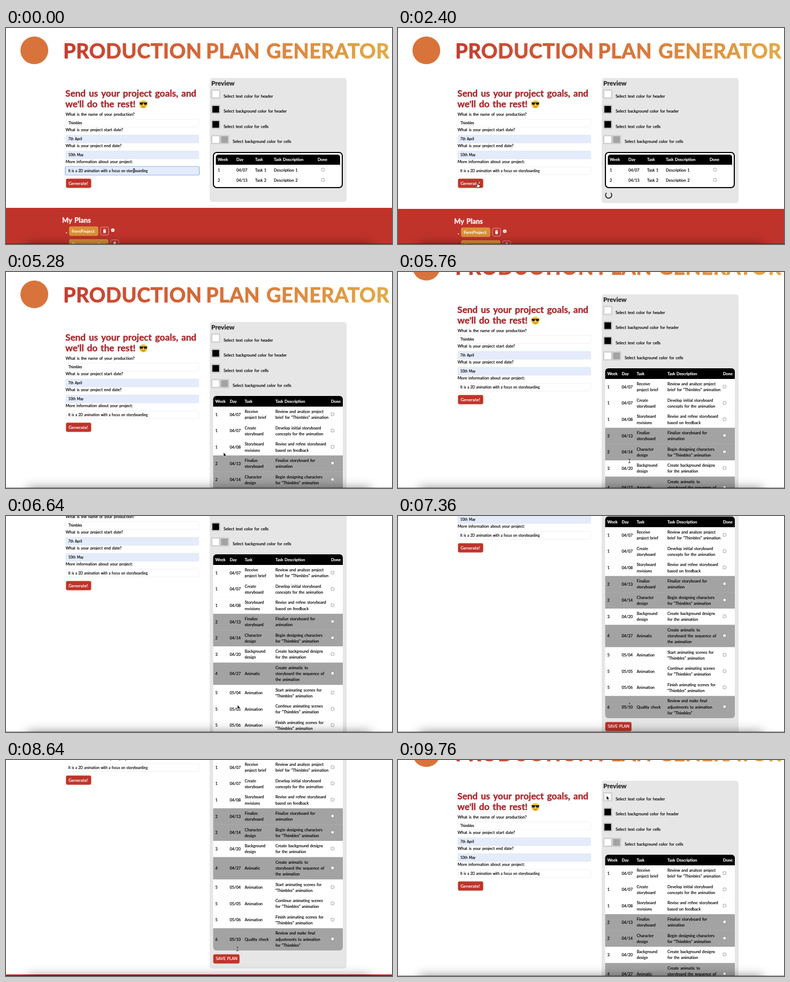
An HTML page with a canvas that plays this animation: 722 px wide and 406 px high, repeating every 9840 ms.

```html
<!DOCTYPE html>
<html lang="en">
<head>
<meta charset="utf-8">
<title>Production Plan Generator</title>
<style>
  html, body { margin: 0; width: 722px; height: 406px; overflow: hidden; background: #fff; }
  canvas { display: block; }
</style>
</head>
<body>
<canvas id="stage" width="722" height="406"></canvas>
<script>
const ctx = document.getElementById('stage').getContext('2d');
const W = 722, H = 406, LOOP = 9840;
const RED = '#c0332b', ORANGE = '#d99037', BLUE = '#e4ecfb', GREY = '#a3a3a3', HEADING = '#ab292c';
const CLICK = 1500, SPIN = 1600, RESULT = 4800;
const PROJECT = 'Thimbles';

// [week, date, task lines, description lines]
const PLAN = [
  ['1', '04/07', 'Receive|project brief', `Review and analyze project|brief for "${PROJECT}" animation`],
  ['1', '04/07', 'Create|storyboard', 'Develop initial storyboard|concepts for the animation'],
  ['1', '04/08', 'Storyboard|revisions', 'Revise and refine storyboard|based on feedback'],
  ['2', '04/13', 'Finalize|storyboard', 'Finalize storyboard for|animation'],
  ['2', '04/14', 'Character|design', `Begin designing characters|for "${PROJECT}" animation`],
  ['3', '04/20', 'Background|design', 'Create background designs|for the animation'],
  ['4', '04/27', 'Animatic', 'Create animatic to|storyboard the sequence of|the animation'],
  ['5', '05/04', 'Animation', `Start animating scenes for|"${PROJECT}" animation`],
  ['5', '05/05', 'Animation', `Continue animating scenes|for "${PROJECT}" animation`],
  ['5', '05/06', 'Animation', `Finish animating scenes for|"${PROJECT}" animation`],
  ['6', '05/10', 'Quality check', `Review and make final|adjustments to animation|for "${PROJECT}"`]
];

// Keyframes: [time, ...values]
const SCROLL = [[5380, 0], [5760, 52], [6200, 118], [6640, 161], [7280, 232],
  [8100, 232], [8360, 300], [8480, 300], [8900, 180], [9320, 55]];
const POINTER = [[300, 239, 268], [1200, 149, 291], [2600, 149, 291], [3300, 263, 251],
  [4900, 263, 251], [5350, 433, 355], [8700, 433, 355], [9500, 390, 67]];

function track(keys, t) {
  if (t <= keys[0][0]) return keys[0].slice(1);
  for (let i = 1; i < keys.length; i++) {
    const a = keys[i - 1], b = keys[i];
    if (t < b[0]) {
      const u = (t - a[0]) / (b[0] - a[0]);
      return a.slice(1).map((v, k) => v + (b[k + 1] - v) * u);
    }
  }
  return keys[keys.length - 1].slice(1);
}

// Text placed by its left edge and the vertical middle of its letters;
// a hairline outline gives the slightly heavy look.
function text(str, x, y, size = 7.5, weight = 400, color = '#000') {
  const base = y + size * 0.34;
  ctx.font = `${weight} ${size}px Lato, sans-serif`;
  ctx.wordSpacing = `${size * 0.1}px`;
  ctx.fillStyle = ctx.strokeStyle = color;
  ctx.lineWidth = size * 0.025;
  ctx.fillText(str, x, base);
  ctx.strokeText(str, x, base);
}

function lines(str, x, y) {
  const parts = str.split('|');
  parts.forEach((s, i) => text(s, x, y + (i - (parts.length - 1) / 2) * 11.2, 7.4));
}

function box(x, y, w, h, r, fill, stroke, lw = 1) {
  ctx.beginPath();
  ctx.roundRect(x, y, w, h, r);
  if (fill) { ctx.fillStyle = fill; ctx.fill(); }
  if (stroke) { ctx.strokeStyle = stroke; ctx.lineWidth = lw; ctx.stroke(); }
}

function disc(x, y, r, fill) {
  ctx.beginPath();
  ctx.arc(x, y, r, 0, Math.PI * 2);
  ctx.fillStyle = fill;
  ctx.fill();
}

function path(points, fill, stroke, lw = 1, close = true) {
  ctx.beginPath();
  points.forEach(([x, y]) => ctx.lineTo(x, y));
  if (close) ctx.closePath();
  if (fill) { ctx.fillStyle = fill; ctx.fill(); }
  if (stroke) { ctx.strokeStyle = stroke; ctx.lineWidth = lw; ctx.stroke(); }
}

const checkbox = (x, y) => box(x - 2.7, y - 2.7, 5.4, 5.4, 1, '#fff', '#777', 0.7);

function button(label, x, y, w, size, fill = RED) {
  box(x + 0.4, y + 0.4, w - 0.8, 16.8, 2.5, fill, fill === RED ? '#cb5f36' : '#e0a048', 0.8);
  text(label, x + 5, y + 8.7, size, 400, '#fff');
}

function header() {
  disc(53, 42, 26, '#d8743b');
  const g = ctx.createLinearGradient(109, 0, 719, 0);
  g.addColorStop(0, '#c43c30');
  g.addColorStop(0.5, '#d7733a');
  g.addColorStop(1, '#e3ab48');
  ctx.letterSpacing = '0.5px';
  [['PRODUCTION', 107], ['PLAN', 374], ['GENERATOR', 487]].forEach(([s, x]) => text(s, x, 43.8, 38, 700, g));
  ctx.letterSpacing = '0px';
}

function emoji(x, y) {
  disc(x, y, 7.6, '#fbc638');
  ctx.fillStyle = '#222';
  ctx.fillRect(x - 7.4, y - 3.4, 14.8, 1.2);
  box(x - 6.8, y - 3.3, 6, 4.4, [0, 0, 2.5, 2.5], '#222');
  box(x + 0.8, y - 3.3, 6, 4.4, [0, 0, 2.5, 2.5], '#222');
  ctx.beginPath();
  ctx.arc(x, y + 1.6, 3.4, 0.3, Math.PI - 0.3);
  ctx.strokeStyle = '#7a4a15';
  ctx.lineWidth = 1;
  ctx.stroke();
}

function form(focused) {
  text('Send us your project goals, and', 111, 123.5, 17.2, 700, HEADING);
  text("we'll do the rest!", 111, 143.5, 17.2, 700, HEADING);
  emoji(257, 143.3);
  [
    ['What is the name of your production?', PROJECT, '#fff'],
    ['What is your project start date?', '7th April', BLUE],
    ['What is your project end date?', '10th May', BLUE],
    ['More information about your project:', 'It is a 2D animation with a focus on storyboarding', focused ? BLUE : '#fff']
  ].forEach(([label, value, fill], i) => {
    const y = 162 + i * 29.9;
    text(label, 111.5, y);
    if (focused && i === 3) box(111.5, y + 9.3, 249.5, 14.8, 2, null, '#a3c1f5', 3);
    box(112, y + 9.3, 248.5, 14.8, 1.5, fill, fill === BLUE ? '#dce5f6' : '#ececec', 0.8);
    text(value, 116.5, y + 17, 6.55);
  });
  button('Generate!', 112, 283, 47.5, 8.4);
}

function swatch(x, y, color) {
  box(x - 7.8, y - 7.8, 15.6, 15.6, 0.5, '#efefef', '#a9a9a9', 0.7);
  box(x - 6.4, y - 6.4, 12.8, 12.8, 0, color, '#999', 0.3);
}

function headRow(y, columns) {
  ['Week', 'Day', 'Task', 'Task Description', 'Done']
    .forEach((s, i) => text(s, columns[i], y, 7.4, 700, '#fff'));
}

function sampleTable() {
  box(388, 234, 241, 66, 6, '#fff', '#000', 2);
  box(392.5, 238, 232.5, 19, [5, 5, 0, 0], '#000');
  headRow(247.5, [396, 431, 466, 501, 583]);
  [['1', '04/07'], ['2', '04/13']].forEach(([n, date], i) => {
    const y = 267 + i * 19;
    text(n, 396, y, 7.4);
    text(date, 431, y, 7.4);
    text(`Task ${i + 1}`, 466, y, 7.4);
    text(`Description ${i + 1}`, 501, y, 7.4);
    checkbox(593, y - 0.8);
  });
}

function planTable() {
  box(387.5, 233, 242.5, 20.2, [6, 6, 0, 0], '#000');
  headRow(243, [391.5, 418.5, 446.5, 504, 608]);
  let y = 253;
  PLAN.forEach(([week, date, task, about], i) => {
    const h = about.split('|').length === 3 ? 41.8 : 30.6;
    const mid = y + h / 2;
    const r = i === PLAN.length - 1 ? [0, 0, 6, 6] : 0;
    box(387.5, y, 242.5, h + (r ? 0 : 0.3), r, week % 2 ? '#fff' : GREY);
    text(week, 391.5, mid, 7.4);
    text(date, 418.5, mid, 7.4);
    lines(task, 446.5, mid);
    lines(about, 504, mid);
    checkbox(610.7, mid - 0.8);
    y += h;
  });
  button('SAVE PLAN', 387.5, 619, 49.5, 7.6);
}

function spinner(t) {
  const gap = -Math.PI / 2 + (t - 2400) / 750 * Math.PI * 2;
  ctx.beginPath();
  ctx.arc(394, 314, 5.8, gap + Math.PI / 4, gap + Math.PI * 7 / 4);
  ctx.strokeStyle = '#222';
  ctx.lineWidth = 1.8;
  ctx.stroke();
}

function preview(t, bottom) {
  box(381, 94, 256, bottom - 94, 5, '#e6e6e6');
  text('Preview', 384, 104, 12.1, 700, '#222');
  swatch(392.3, 124.3, '#fff');
  swatch(392.3, 152.8, '#000');
  swatch(392.3, 181.2, '#000');
  swatch(392.3, 209.7, '#fff');
  swatch(408.8, 209.7, GREY);
  ['text color for header', 'background color for header', 'text color for cells', 'background color for cells']
    .forEach((s, i) => text('Select ' + s, i === 3 ? 424 : 407, 128 + i * 28.5));
  if (t >= RESULT) planTable(); else sampleTable();
  if (t >= SPIN && t < RESULT) spinner(t);
}

function trash(x, y) {
  box(x, y, 15, 15, 2.5, null, '#e8b9b5', 0.8);
  ctx.fillStyle = '#fff';
  ctx.fillRect(x + 4.8, y + 4.2, 5.4, 1);
  ctx.fillRect(x + 6.3, y + 3.4, 2.4, 1);
  box(x + 5.2, y + 5.7, 4.6, 5.5, 0.8, '#fff');
}

function footer(top) {
  ctx.fillStyle = RED;
  ctx.fillRect(0, top, W, 300);
  text('My Plans', 105, top + 23.5, 12.8, 700, '#fff');
  ['FernProject', 'flower animation'].forEach((name, i) => {
    const y = top + 35 + i * 24, w = i ? 73.5 : 54.5;
    disc(113, y + 12, 1.1, '#fff');
    button(name, 118, y, w, 8.4, ORANGE);
    trash(118 + w + 4.3, y + 1.2);
    const x = 118 + w + 27.2;
    if (i) return;
    disc(x, y + 7, 3.3, '#fff');
    path([[x - 1.5, y + 7], [x - 0.4, y + 8.1], [x + 1.6, y + 5.9]], null, RED, 0.8, false);
  });
}

function windowShadow() {
  ctx.save();
  ctx.shadowColor = 'rgba(0,0,0,.45)';
  ctx.shadowBlur = 20;
  ctx.fillStyle = '#000';
  ctx.fillRect(40, H, 642, 30);
  ctx.restore();
  ctx.fillStyle = 'rgba(0,0,0,.45)';
  ctx.fillRect(0, H - 1, W, 1);
}

const ARROW = [[0, 0], [0, 8], [1.8, 6.4], [3, 9.2], [4.3, 8.6], [3.1, 5.9], [5.6, 5.9]];
const HAND = [[-1, 0], [0.4, 0], [0.8, 3], [4, 3.8], [4.4, 6], [3.4, 9], [-1, 9], [-3.6, 5.4], [-2.6, 4.8], [-1, 6]];
const BEAM = [[-1.6, -3.8], [0, -3.2], [1.6, -3.8], [0, -3.2], [0, 3.2], [-1.6, 3.8], [0, 3.2], [1.6, 3.8]];

function pointer(t) {
  const [x, y] = track(POINTER, t);
  const onButton = x > 112 && x < 159 && y > 283 && y < 300;
  const onInput = x < 361 && y > 261 && y < 277;
  const onTable = t > 5350 && t < 8700 && !(t > 6300 && t < 7300);
  ctx.save();
  ctx.translate(x, y);
  ctx.lineJoin = 'round';
  if (onButton) path(HAND, '#fff', '#111', 0.9);
  else if (onInput || onTable) {
    path(BEAM, null, 'rgba(255,255,255,.8)', 1.8, false);
    path(BEAM, null, '#111', 0.9, false);
  } else path(ARROW, '#000', '#fff', 0.7);
  ctx.restore();
}

function draw(t) {
  const [scroll] = track(SCROLL, t);
  const bottom = t >= RESULT ? 646 : t >= SPIN ? 329 : 327;
  ctx.fillStyle = '#fff';
  ctx.fillRect(0, 0, W, H);
  ctx.save();
  ctx.translate(0, -Math.round(scroll));
  ctx.lineJoin = 'round';
  header();
  form(t < CLICK);
  preview(t, bottom);
  footer(bottom + 11);
  ctx.restore();
  windowShadow();
  pointer(t);
}

const start = performance.now();
function tick() {
  draw((performance.now() - start) % LOOP);
  requestAnimationFrame(tick);
}
tick();
</script>
</body>
</html>
```
